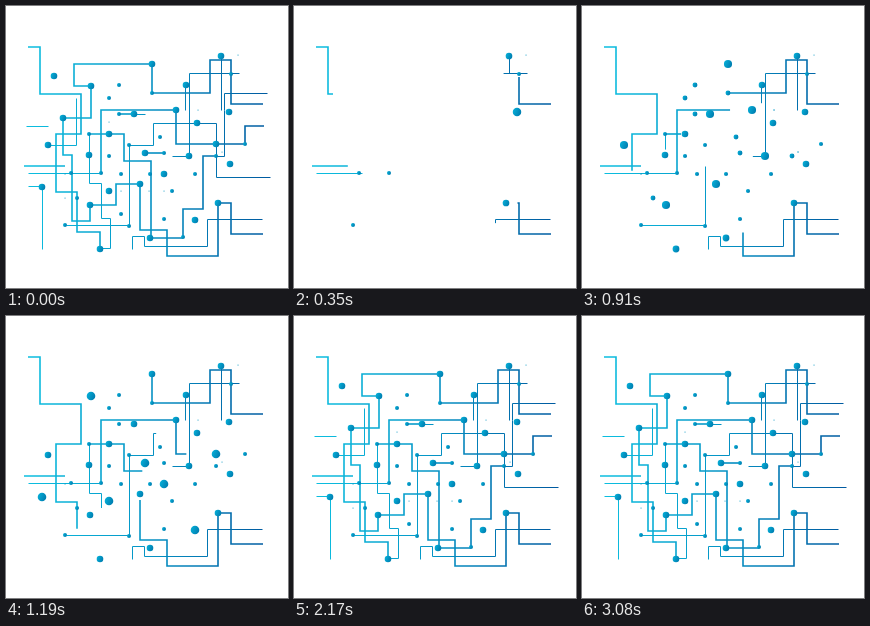
An HTML page that plays this animation: 282 by 282 pixels, repeating every 3150 ms.

```html
<!DOCTYPE html>
<html lang="en">
<head>
<meta charset="utf-8">
<title>Circuit</title>
<style>
  html, body { margin: 0; width: 100%; height: 100%; overflow: hidden; background: #fff; }
  svg { display: block; width: 100vw; height: 100vh; }
</style>
</head>
<body>
<svg viewBox="0 0 282 282">
  <defs>
    <linearGradient id="wire" gradientUnits="userSpaceOnUse" x1="20" y1="0" x2="262" y2="0">
      <stop offset="0" stop-color="#0cbfe0"/>
      <stop offset=".45" stop-color="#0598c8"/>
      <stop offset="1" stop-color="#005aa0"/>
    </linearGradient>
    <linearGradient id="node" x2="1" y2=".4">
      <stop offset="0" stop-color="#06b4dc"/>
      <stop offset="1" stop-color="#0080b2"/>
    </linearGradient>
  </defs>
  <g id="bold" fill="none" stroke="url(#wire)" stroke-width="1.6"></g>
  <g id="thin" fill="none" stroke="url(#wire)" transform="translate(.5 .5)"></g>
  <g id="nodes" fill="url(#node)"></g>
</svg>
<script>
const LOOP = 3150, STEP = 70;
const RADIUS = { big: 3.3, small: 2, speck: .6 };
const wires = [], nodes = [];

function add(parent, tag, attrs) {
  const el = document.createElementNS('http://www.w3.org/2000/svg', tag);
  for (const key in attrs) el.setAttribute(key, attrs[key]);
  return document.getElementById(parent).appendChild(el);
}

// Everything in a wave starts together; longer wires take longer to draw.
function wave(born, parts) {
  for (const weight of ['bold', 'thin']) {
    for (const d of parts[weight] ?? []) {
      const el = add(weight, 'path', { d });
      const length = el.getTotalLength();
      wires.push({ el, born, length, duration: 150 + 3.6 * length });
    }
  }
  for (const size in RADIUS) {
    for (const place of parts[size]?.split(' ') ?? []) {
      const [cx, cy] = place.split(',');
      nodes.push({ el: add('nodes', 'circle', { cx, cy }), born, radius: RADIUS[size] });
    }
  }
}

wave(90, {
  bold: [
    'M22 41H34V88H75V128H50V186H71V226H94V243',
    'M257 98H225V54H204V87H146',
    'M257 228H225V197H212V250H161V224H134V178H110V199H84',
    'M18 160H59'
  ],
  thin: ['M22 167H95', 'M256 213H201V240H138V230H126V243'],
  big: '215,50 212,197',
  small: '225,68 59,219 95,167 65,167',
  speck: '232,49'
});
wave(240, {
  thin: ['M233 67H183V150H166', 'M215 50V104'],
  big: '223,106'
});
wave(420, {
  bold: ['M95 167V104H170V138H239'],
  thin: ['M60 219H123V139H147V117H210V171H264'],
  big: '180,79 83,149 103,128 224,158 191,117',
  small: '83,128 123,139 123,220'
});
wave(740, {
  thin: ['M179 79V104'],
  big: '146,58 170,104 183,150 128,108 42,139 84,199 134,178',
  small: '146,87 113,79 103,92 113,108 154,131 158,147 210,150 71,192',
  speck: '192,104 216,146 59,168'
});
wave(840, {
  bold: ['M83 128H118V155H145V232H177'],
  thin: ['M83 128V177H95V212H104V242H94'],
  big: '144,232 94,243',
  small: '115,168 103,150 166,185 189,168 158,213 239,138 144,168'
});
wave(1070, {
  bold: ['M146 87V58H68V80H85'],
  big: '85,80 36,181 103,185 158,168 189,214 210,138 139,147'
});
wave(1230, {
  bold: ['M113 108H128', 'M139 147H158'],
  thin: ['M128 108H139', 'M70 92V139H42'],
  small: '115,208 177,231',
  speck: '115,185 143,185 158,185 103,116 59,192'
});
wave(1400, {
  bold: ['M85 80V112H57', 'M210 150H197V203H177V231'],
  thin: ['M218 104V87H261', 'M218 104V150H210'],
  big: '57,112'
});
wave(1640, {
  bold: ['M57 112V149H66V170', 'M84 199V215H66V170', 'M239 138V120H258'],
  thin: ['M42 120H20', 'M22 180H36V243'],
  big: '48,70'
});

// Swell past full size, then settle.
function pop(age) {
  if (age <= 0) return 0;
  if (age < 120) return 1.3 * Math.sin(age / 120 * Math.PI / 2);
  if (age < 280) return 1.15 + .15 * Math.cos((age - 120) / 160 * Math.PI);
  return 1;
}

function draw(time) {
  const t = Math.floor(time % LOOP / STEP) * STEP || LOOP;
  for (const { el, born, length, duration } of wires) {
    const part = Math.min(1, (t - born) / duration);
    el.setAttribute('visibility', part > 0 ? 'visible' : 'hidden');
    el.setAttribute('stroke-dasharray', `${Math.max(0, part) * length} 999`);
  }
  for (const { el, born, radius } of nodes) el.setAttribute('r', radius * pop(t - born));
}

let start;
function tick(now) {
  start ??= now;
  draw(now - start);
  requestAnimationFrame(tick);
}
draw(0);
requestAnimationFrame(tick);
</script>
</body>
</html>
```
